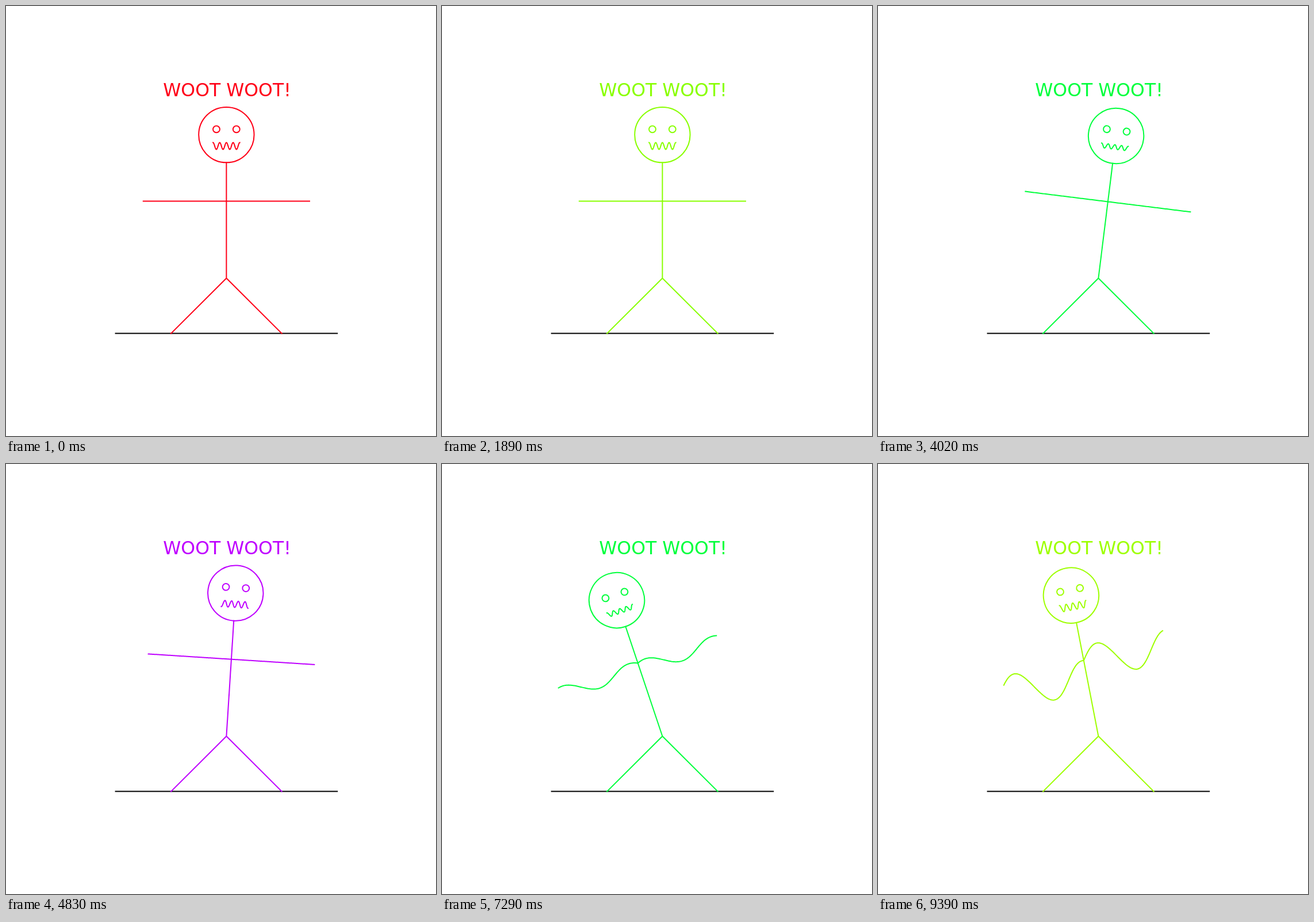
An HTML page for the animation above (9.42 s loop, 748 by 748 pixels).

```html
<!DOCTYPE html>
<html lang="en">
<head>
<meta charset="utf-8">
<title>Dancing stick figure</title>
<style>
  html, body { margin: 0; width: 100%; height: 100%; overflow: hidden; background: #fff; }
  svg { display: block; width: 748px; height: 748px; }
  path, circle { fill: none; stroke-width: 2; stroke-linecap: square; stroke-linejoin: round; }
  #man path, #man circle { stroke: currentColor; }
  text { font: 31.5px "DejaVu Sans", sans-serif; fill: currentColor; }
</style>
</head>
<body>
<svg viewBox="0 0 748 748">
  <path d="M190.6 569.5H576.2" stroke="#000"/>
  <g id="man">
    <text x="273.2" y="156.6">WOOT WOOT!</text>
    <g transform="translate(383.4 473.5)">
      <path d="M-96.4 96.2L0 0L96.4 96.2"/>
      <g id="torso">
        <path d="M0 0V-201.3"/>
        <circle cy="-249.4" r="48.2"/>
        <circle cx="-17.4" cy="-259.1" r="5.9"/>
        <circle cx="17.4" cy="-259.1" r="5.9"/>
        <path id="mouth"/>
        <path id="left"/>
        <path id="right"/>
      </g>
    </g>
  </g>
</svg>
<script>
const STEP = 30, STEPS = 314;
const UNIT = 48.2, ARM = 3 * UNIT, SHOULDER = -134.1;
const MOUTH = { y: -230, half: 23.3, amp: 6 };
const { sin, cos, PI, max } = Math;
const $ = id => document.getElementById(id);

// Polyline of y = f(x) sampled evenly between two x values
function curve(from, to, f, count = 80) {
  let d = "";
  for (let i = 0; i <= count; i++) {
    const x = from + (to - from) * i / count;
    d += (i ? "L" : "M") + x.toFixed(2) + " " + f(x).toFixed(2);
  }
  return d;
}

// Lean in degrees: the running sum of -2 cos(), one term per step after t = 10
const lean = t => t <= 10 ? 0 : 1 - sin(t - 9.95) / sin(0.05);

function draw(t) {
  $("man").style.color = `hsl(${354.4 * (1 + cos(t / 3)) / 2} 100% 50%)`;
  $("torso").setAttribute("transform", `rotate(${lean(t)})`);

  const grin = MOUTH.amp * cos(t), ripple = 4 * PI / MOUTH.half;
  $("mouth").setAttribute("d",
    curve(-MOUTH.half, MOUTH.half, x => MOUTH.y - grin * cos(ripple * x), 120));

  // Travelling waves, both pinned at the shoulder
  const swing = 0.05 * UNIT * max(0, t - 19.3);
  const wave = f => x => SHOULDER - swing * (f(2.5 * x / UNIT - t) - f(-t));
  $("left").setAttribute("d", curve(-ARM, 0, wave(cos)));
  $("right").setAttribute("d", curve(0, ARM, wave(sin)));
}

let last = -1;
function tick() {
  const n = Math.floor(performance.now() / STEP) % STEPS;
  if (n !== last) draw((last = n) / 10);
  requestAnimationFrame(tick);
}
tick();
</script>
</body>
</html>
```
